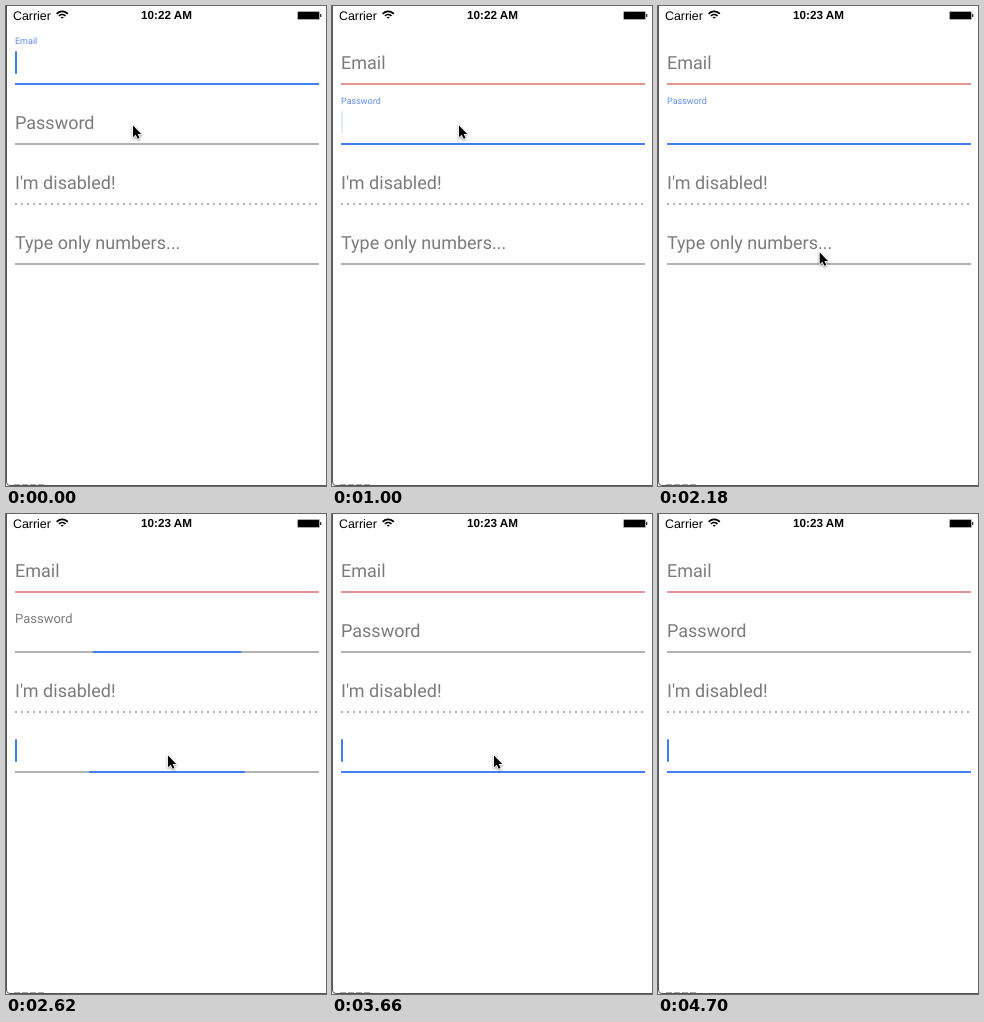
An HTML page with a canvas for the animation above (5010 ms loop, 320 by 480 pixels).

```html
<!DOCTYPE html>
<html lang="en">
<meta charset="utf-8">
<title>Text fields</title>
<style>
  html, body { margin: 0; width: 100%; height: 100%; overflow: hidden; background: #fff; }
  canvas { display: block; }
</style>
<canvas id="stage" width="320" height="480"></canvas>
<script>
const ctx = document.getElementById('stage').getContext('2d');
const LOOP = 5010, TICK = 146.7, FIRST_TICK = 255;
const BLUE = '#3f7ff0', GREY = '#b2b2b2', RED = '#e69490', TEXT = '#7b7b7b';
const LEFT = 9, WIDTH = 304, LABEL_SIZE = 18;
const TO_PASSWORD = 237, TO_NUMBERS = 2437;

// Focus interval of each field; fade is when its caret first blinks out.
const FIELDS = [
  { label: 'Email', from: -LOOP, to: TO_PASSWORD, fade: LOOP, base: RED, floats: true },
  { label: 'Password', from: TO_PASSWORD, to: TO_NUMBERS, fade: 886, base: GREY, floats: true },
  { label: "I'm disabled!", disabled: true },
  { label: 'Type only numbers...', from: TO_NUMBERS, to: LOOP, fade: 3145, base: GREY }
];

const ARROW = new Path2D('M0 0V15L3.5 11.8L6 17L8.4 16L6 11H10.6Z');

const clamp = v => Math.min(1, Math.max(0, v));
const lerp = (a, b, p) => a + (b - a) * p;
const ease = p => p * p * (3 - 2 * p);
const progress = (t, start, duration) => ease(clamp((t - start) / duration));

function rect(x, y, w, h, color, radius = 0) {
  ctx.fillStyle = color;
  ctx.beginPath();
  ctx.roundRect(x, y, w, h, radius);
  ctx.fill();
}

function text(string, x, y, font, color, align = 'left') {
  ctx.font = font;
  ctx.fillStyle = color;
  ctx.textAlign = align;
  ctx.fillText(string, x, y);
}

function caretOpacity(t, fade) {
  if (t < fade) return 1;
  const u = (t - fade) % 886;
  return u < 120 ? 1 - u / 120 : clamp((u - 396) / 84);
}

function drawField(field, top, t) {
  const { label, from, to, fade, base, floats, disabled } = field;
  const lineY = top + 57;
  const focused = t >= from && t < to;
  const focus = disabled ? 0 : progress(t, from, 325) - progress(t, to, 325);

  if (disabled) {
    for (let x = LEFT; x < LEFT + WIDTH; x += 6) rect(x, lineY, 2, 2, GREY);
  } else {
    rect(LEFT, lineY, WIDTH, 2, base);
    rect(LEFT + WIDTH * (1 - focus) / 2, lineY, WIDTH * focus, 2, BLUE);
  }

  if (floats || !focused) {
    const inline = floats ? (1 - focus) ** 1.2 : 1;
    const size = LABEL_SIZE * lerp(0.5, 1, inline);
    text(label, LEFT, top + lerp(18, 43, inline), `${size}px Roboto, sans-serif`,
      focused ? '#5f8bf0' : TEXT);
  }

  if (focused) {
    ctx.globalAlpha = caretOpacity(t, fade);
    rect(LEFT, top + 25, 2, 23, BLUE, 1);
    ctx.globalAlpha = 1;
  }
}

function drawStatusBar(t) {
  text('Carrier', 7, 13.6, '12.4px "Liberation Sans", sans-serif', '#000');
  text(t < 2100 ? '10:22 AM' : '10:23 AM', 160.5, 13.4,
    'bold 11.7px "Liberation Sans", sans-serif', '#000', 'center');

  ctx.strokeStyle = '#000';
  ctx.lineWidth = 1.7;
  for (let r = 1.2; r < 8; r += 3.1) {
    ctx.beginPath();
    ctx.arc(56.2, 12.8, r, -Math.PI * 0.77, -Math.PI * 0.23);
    ctx.stroke();
  }

  rect(291, 5, 23, 9, '#aaa', 1.5);
  rect(292, 6, 21, 7, '#000', 0.5);
  rect(314, 8, 1.3, 3, '#333');
}

function drawEdges() {
  ctx.strokeStyle = '#555';
  ctx.lineWidth = 1;
  ctx.beginPath();
  ctx.moveTo(0.5, 0);
  ctx.lineTo(0.5, 476);
  ctx.quadraticCurveTo(0.5, 479.5, 4, 479.5);
  ctx.lineTo(320, 479.5);
  ctx.stroke();
  for (let x = 8; x < 40; x += 8) rect(x, 478, 6, 1, '#aaa');
}

// Two eased glides, then an accelerating exit past the bottom right corner.
function pointerPosition(t) {
  const down = progress(t, 1000, 540);
  const up = progress(t, 1900, 400);
  const exit = Math.max(0, (t - 3969) / 540) ** 1.62;
  return [126 + 34 * down + up + 132 * exit, 118 + 140 * down - 18 * up + 228 * exit];
}

function drawPointer(t) {
  const [x, y] = pointerPosition(t);
  ctx.save();
  ctx.translate(x + 1, y + 1.5);
  ctx.scale(0.78, 0.78);
  ctx.lineJoin = 'round';
  ctx.lineWidth = 2;
  ctx.strokeStyle = '#fff';
  ctx.shadowColor = 'rgba(0,0,0,.45)';
  ctx.shadowBlur = 2.5;
  ctx.shadowOffsetY = 1;
  ctx.stroke(ARROW);
  ctx.shadowColor = 'transparent';
  ctx.fillStyle = '#000';
  ctx.fill(ARROW);
  ctx.restore();
}

function draw() {
  // The screen refreshes in even steps.
  const now = performance.now() % LOOP;
  const t = FIRST_TICK + Math.floor((now - FIRST_TICK) / TICK) * TICK;
  rect(0, 0, 320, 480, '#fff');
  drawStatusBar(t);
  FIELDS.forEach((field, i) => drawField(field, 20 + 60 * i, t));
  drawEdges();
  drawPointer(t);
  requestAnimationFrame(draw);
}

ctx.textRendering = 'geometricPrecision';
draw();
</script>
</html>
```
